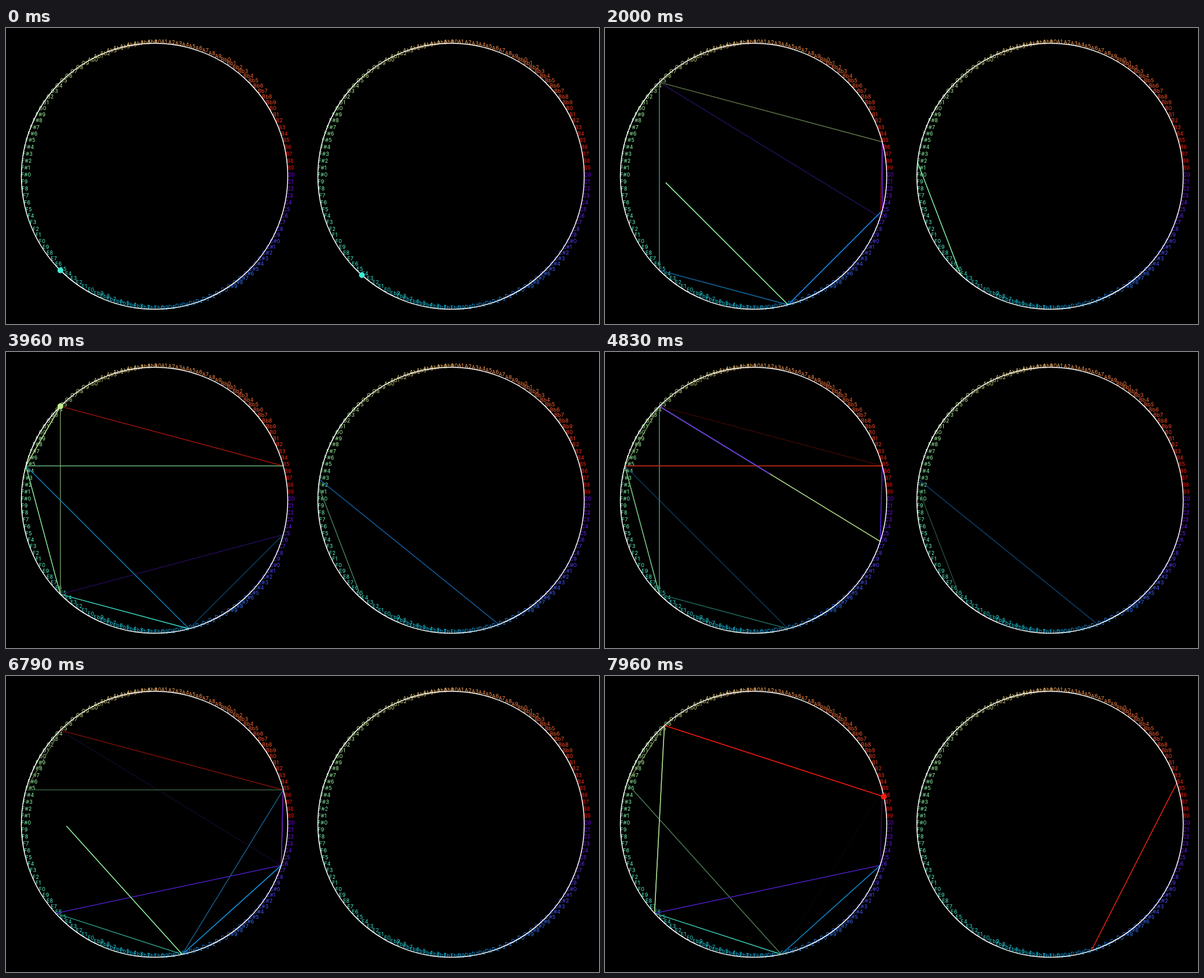
Animation of 1024x512 px, one loop 8000 ms. Source, as an HTML page with a canvas:

```html
<!DOCTYPE html>
<html lang="en">
<head>
<meta charset="utf-8">
<title>Two note circles</title>
<style>
  html, body { margin: 0; width: 100%; height: 100%; overflow: hidden; background: #000; }
  canvas { display: block; position: absolute; left: 0; top: 0; }
</style>
</head>
<body>
<canvas id="labels" width="1024" height="512"></canvas>
<canvas id="stage" width="1024" height="512"></canvas>
<script>
const LOOP = 8000, FPS = 24, R = 230, STEPS = 120, MID = 256.5;
const STEP_FRAMES = 3.85, STEP_SEC = STEP_FRAMES / FPS;
const NAMES = ['C', 'C#', 'D', 'Eb', 'E', 'F', 'F#', 'G', 'Ab', 'A', 'Bb', 'B'];

// Position on a circle for a name such as "F#5": ten steps per note.
const step = s => NAMES.indexOf(s.slice(0, -1)) * 10 + +s.slice(-1);

const melody = ('E5 D5 E5 G5 C6 B5 G5 E5 D5 C5 B5 C5 D5 F#5 G5 E5 C5 D5 E5 G5 B5 ' +
  'F#5 D5 E5 F#5 G5 E5 F#5 B5 C6 G5 C6 D6 B5 F#5 G5 B5 D6 E6 C6 B5 C6 D6 F#6 ' +
  'G6 E6 C6 D6 E6 G6 B6').split(' ').map((s, at) => ({ at, i: step(s) }));

const bass = [['E4', 0], ['F#2', 12], ['F#3', 16], ['D3', 17], ['D4', 37.25], ['B4', 48]]
  .map(([s, at]) => ({ at, i: step(s) }));

// life: seconds until a line has faded out
const voices = [
  { cx: MID, life: 2.2, notes: melody },
  { cx: MID + 512, life: 4.2, notes: bass }
];

// Rainbow from violet through green to red, dimmed by k.
function color(i, k = 1) {
  const x = i / STEPS;
  const c = [Math.abs(2 * x - 0.5), Math.sin(Math.PI * x), Math.cos(Math.PI * x / 2)];
  return `rgb(${c.map(v => Math.round(255 * k * Math.min(1, v))).join(',')})`;
}

function point(cx, i) {
  const a = i / STEPS * 2 * Math.PI;
  return [cx + R * Math.cos(a), MID + R * Math.sin(a)];
}

function drawLabels() {
  const g = document.getElementById('labels').getContext('2d');
  g.font = '9px Inter, Roboto, sans-serif';
  g.letterSpacing = '0.2px';
  for (const { cx } of voices) {
    for (let i = 0; i < STEPS; i++) {
      const [x, y] = point(cx, i);
      g.fillStyle = color(i);
      g.fillText(NAMES[Math.floor(i / 10)] + i % 10, x - 0.5, y + 0.5);
    }
  }
}

const ctx = document.getElementById('stage').getContext('2d');

// Time in note steps, moving by quarters.
function beat(frame) {
  return frame <= 0 ? frame : Math.round((frame / STEP_FRAMES + 0.4) * 4) / 4;
}

function drawVoice({ cx, life, notes }, now, before) {
  ctx.lineWidth = 1.5;
  for (let n = 1; n < notes.length; n++) {
    const { at, i } = notes[n];
    const p = Math.min(1, now - at + 1);
    if (p <= 0) break;
    const glow = 1 - Math.max(0, now - at) * STEP_SEC / life;
    if (glow <= 0) continue;
    const [x0, y0] = point(cx, notes[n - 1].i), [x1, y1] = point(cx, i);
    ctx.strokeStyle = color(i, glow);
    ctx.beginPath();
    ctx.moveTo(x0, y0);
    ctx.lineTo(x0 + (x1 - x0) * p, y0 + (y1 - y0) * p);
    ctx.stroke();
  }

  ctx.strokeStyle = '#fff';
  ctx.beginPath();
  ctx.arc(cx, MID, R, 0, 2 * Math.PI);
  ctx.stroke();

  const hit = notes.find(({ at }) => before < at && at <= now);
  if (hit) {
    ctx.fillStyle = color(hit.i);
    ctx.beginPath();
    ctx.arc(...point(cx, hit.i), 5, 0, 2 * Math.PI);
    ctx.fill();
  }
}

function draw() {
  const frame = Math.floor((performance.now() % LOOP) * FPS / 1000 + 0.2);
  ctx.clearRect(0, 0, 1024, 512);
  for (const v of voices) drawVoice(v, beat(frame), beat(frame - 1));
  requestAnimationFrame(draw);
}

drawLabels();
draw();
</script>
</body>
</html>
```
